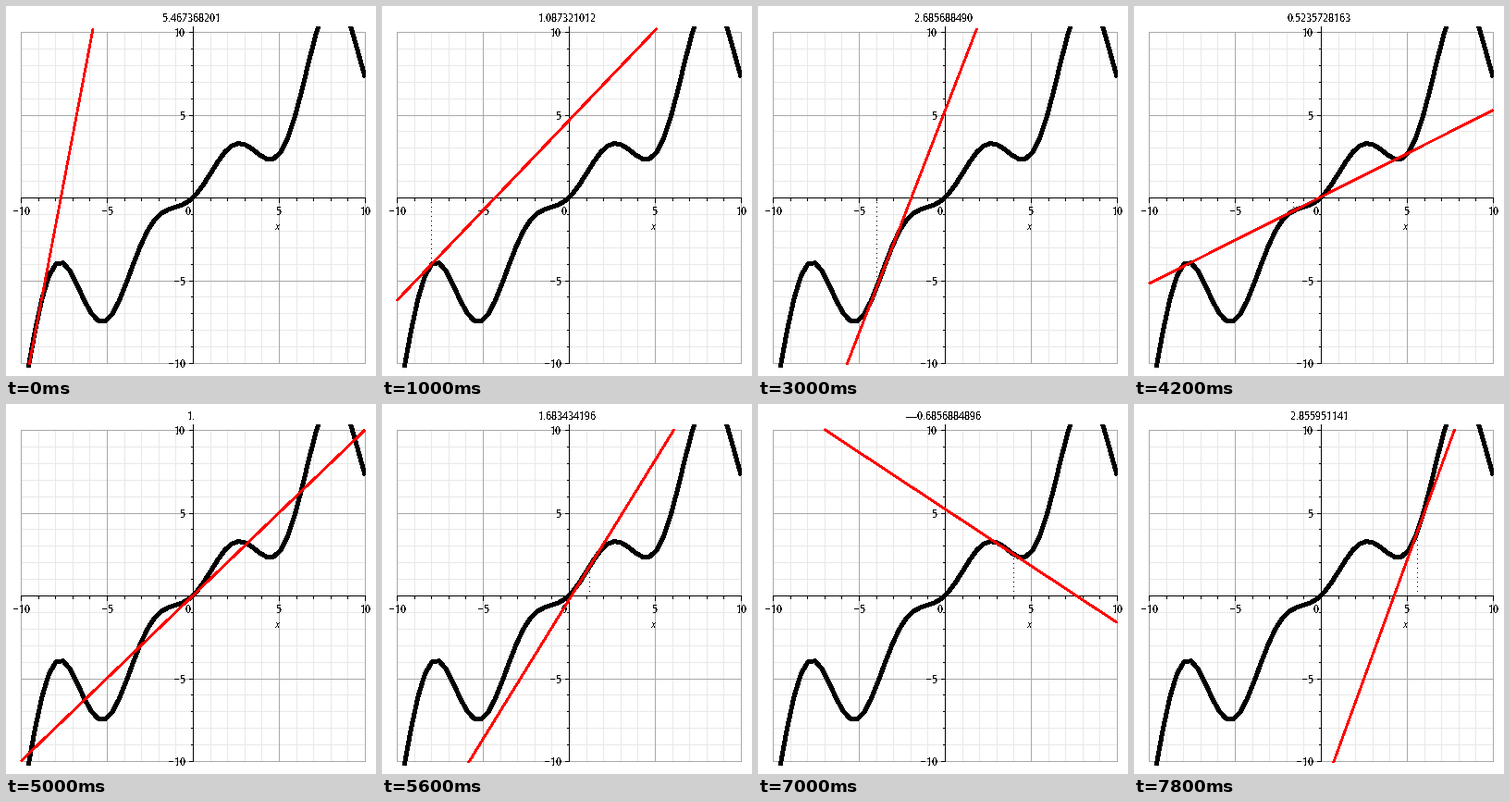
Write a matplotlib script that moves like this. It is 400 px wide and 400 px high and loops after 8000 ms.

```python
import numpy as np
import matplotlib.pyplot as plt
from matplotlib.animation import FuncAnimation
from matplotlib.patches import Rectangle

PX = 0.72  # points per pixel at 100 dpi
plt.rcParams["font.family"] = "Liberation Serif"
plt.rcParams["text.antialiased"] = False
plt.rcParams["text.hinting"] = "default"
plt.rcParams["text.hinting_factor"] = 1

FRAMES, INTERVAL = 40, 200
THIN = 0.8   # fills exactly one pixel without antialiasing
NUDGE = 0.4  # pen offset of the thick lines
RED = "#ff0000"


def px(x):
    return 202.5 + 18.6 * x


def py(y):
    return 207.5 - 17.9 * y


def f(x):
    return x + x * np.sin(x) / 2


def round10(v):
    """Round to ten significant digits, ties to even."""
    if v == 0:
        return 0.0
    scale = 10.0 ** (9 - int(np.floor(np.log10(abs(v)))))
    return round(round(float(v * scale), 3)) / scale


def slope(x):
    half_sin = round10(round10(np.sin(x)) / 2)
    x_cos = round10(x / 2 * round10(np.cos(x)))
    return round10(round10(1 + half_sin) + x_cos)


def number(v):
    if v == 1:
        return "1."
    digits = 9 - int(np.floor(np.log10(abs(v))))
    return f"{v:.{digits}f}".replace("-", "\u2014")


fig = plt.figure(figsize=(4, 4), dpi=100, facecolor="white")
ax = fig.add_axes([0, 0, 1, 1])
ax.set_xlim(0, 400)
ax.set_ylim(400, 0)
ax.axis("off")


def stroke(xs, ys, color, width, z, **kw):
    return ax.plot(xs, ys, color=color, lw=width * PX, zorder=z,
                   antialiased=False, snap=False,
                   solid_capstyle="butt", **kw)[0]


def label(x, y, text, ha="center", **kw):
    return ax.text(x, y, text, ha=ha, va="baseline", color="black",
                   fontsize=12 * PX, zorder=4, **kw)


def draw_grid():
    left, right, bottom, top = px(-10), px(10), py(-10), py(10)
    for i in range(-10, 11):
        major = i % 5 == 0
        color, z = ("#a8a8a8", 2) if major else ("#e8e8e8", 1)
        # whole pixels, so every line is one pixel wide
        gx, gy = np.floor(px(i)) + 0.5, np.floor(py(i)) + 0.5
        stroke([gx, gx], [top, bottom], color, THIN, z)
        stroke([left, right], [gy, gy], color, THIN, z)
        size = 5 if major else 3
        stroke([gx, gx], [207, 208 + size], "black", THIN, 3)
        stroke([203 - size, 203], [gy, gy], "black", THIN, 3)
        if major:
            text = str(i).replace("-", "\u2212")
            label(gx - (6 if i == 0 else 0), 226, text)
            if i:
                label(194, gy + 4.5, text, ha="right")
    stroke([left, right], [207.5] * 2, "black", THIN, 3)
    stroke([202.5] * 2, [22, bottom], "black", THIN, 3)
    label(294, 242, "x", style="italic")


draw_grid()

xs = np.linspace(-10, 10, 50)
curve = stroke(px(xs) - NUDGE, py(f(xs)) - NUDGE, "black", 3.9, 5,
               solid_joinstyle="round")
curve.set_clip_path(Rectangle((14, 22), 375, 369, transform=ax.transData))

dots = stroke([], [], "black", THIN, 4, linestyle=(0, (1, 5.25)),
              dash_capstyle="butt")
tangent = stroke([], [], RED, 1.7, 6)
title = label(200.5, 17, "")


def update(k):
    x = round(-10 + 0.4 * k, 1)
    y, m = f(x), slope(x)
    title.set_text(number(m))

    # keep the tangent inside the plot window
    top = 10.2 if x < 0 else 10.03
    ends = sorted([x + (-10.08 - y) / m, x + (top - y) / m])
    t = np.clip(ends, -10, 10)
    tangent.set_data(px(t) - NUDGE, py(y + m * (t - x)) - NUDGE)

    if abs(y) <= 10:
        dots.set_data([px(x) // 1 + 0.5] * 2, [py(0), py(y)])
    else:
        dots.set_data([], [])
    return title, tangent, dots


anim = FuncAnimation(fig, update, frames=FRAMES, interval=INTERVAL,
                     repeat=True, repeat_delay=0, blit=False)
plt.show()
```
